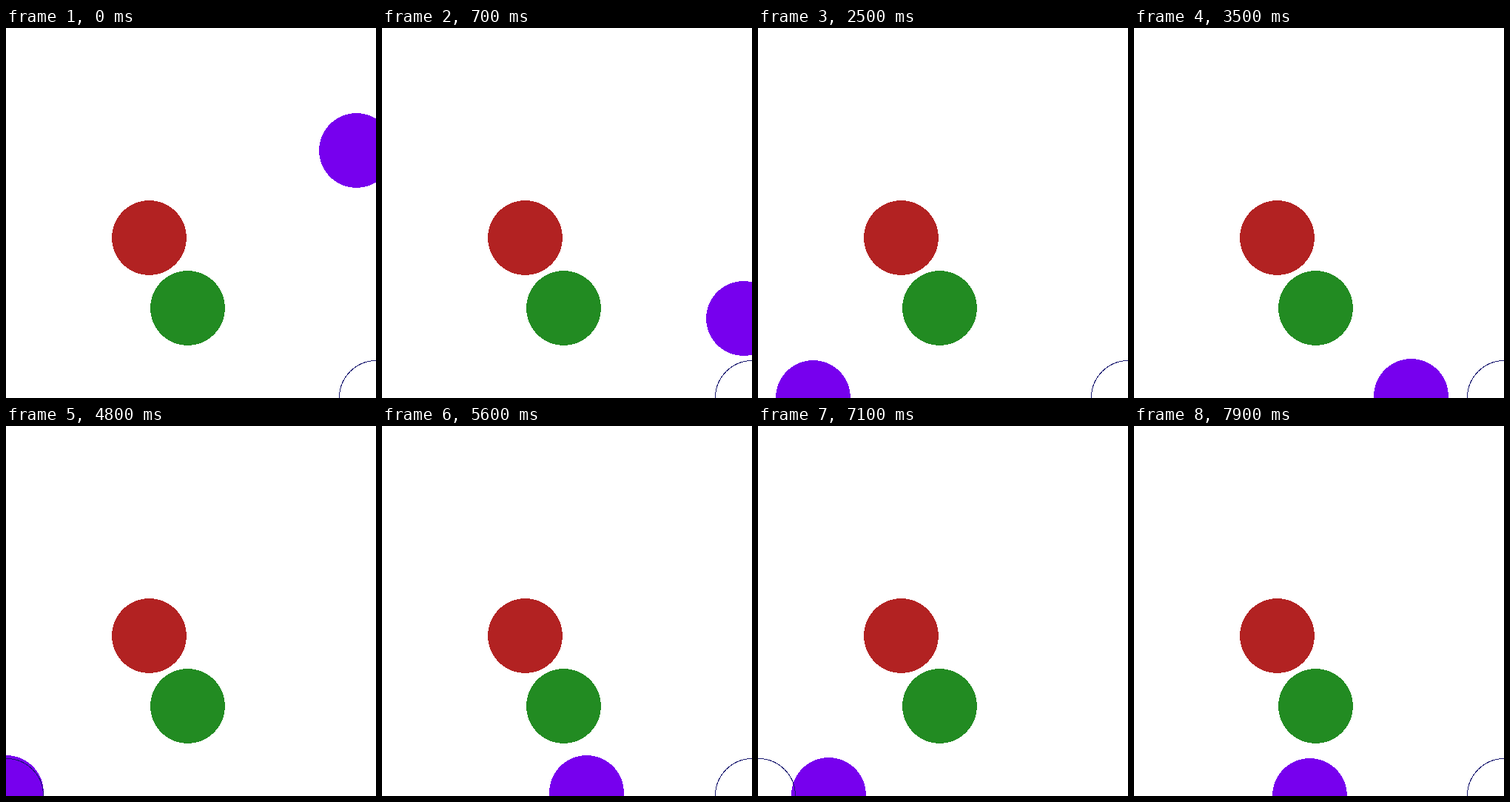
An HTML page that plays this animation: 500x500 px, repeating every 8 s.

```html
<!DOCTYPE html>
<html lang="en">
<head>
<meta charset="utf-8">
<title>Chasing circle</title>
<style>
  html, body { margin: 0; width: 100%; height: 100%; overflow: hidden; background: #fff; }
  svg { display: block; width: 100vw; height: 100vh; shape-rendering: crispEdges; }
</style>
</head>
<body>
<svg viewBox="0 0 500 500">
  <circle cx="193.5" cy="283.5" r="50.4" fill="#b22222"/>
  <circle cx="245.5" cy="378.5" r="50.4" fill="#228b22"/>
  <circle id="chaser" r="50.4" fill="#7700ee"/>
  <circle id="goal" cy="499.5" r="50" fill="none" stroke="#191970"/>
</svg>
<script>
  const LOOP = 8000, STEP = 100, SIZE = 500, FLOOR = 499;
  const FALL_SPEED = 0.3244, GOAL_DELAY = 100;
  const chaser = document.getElementById('chaser');
  const goal = document.getElementById('goal');

  // Where the chaser turns around; it runs at an even speed in between.
  const turns = [
    { t: 0, x: 473 }, { t: 1250, x: SIZE }, { t: 2253, x: 0 }, { t: 3700, x: 434 },
    { t: 4800, x: 0 }, { t: 6250, x: SIZE }, { t: 7300, x: 0 }, { t: LOOP, x: 276 }
  ];

  function legAt(t) {
    const end = turns.findIndex(turn => turn.t > t);
    return [turns[end - 1], turns[end]];
  }

  function chaserX(t) {
    const [from, to] = legAt(t);
    return from.x + (to.x - from.x) * (t - from.t) / (to.t - from.t);
  }

  // Falls to the floor, later rises a little and sinks back.
  function chaserY(t) {
    const phase = Math.min(1, Math.max(0, (t - 2500) / 5000));
    return Math.min(FLOOR, 165 + FALL_SPEED * t) - 4 * Math.sin(Math.PI * phase);
  }

  // The goal waits in the corner ahead and swaps shortly after each turn.
  function goalX(t) {
    const [from, to] = legAt(Math.max(0, t - GOAL_DELAY));
    return to.x > from.x ? SIZE : 0;
  }

  function draw(t) {
    chaser.setAttribute('cx', Math.round(chaserX(t)) + 0.5);
    chaser.setAttribute('cy', Math.round(chaserY(t)) + 0.5);
    goal.setAttribute('cx', goalX(t) + 0.5);
  }

  const start = performance.now();
  function tick() {
    const t = (performance.now() - start) % LOOP;
    draw(Math.floor(t / STEP) * STEP);
    requestAnimationFrame(tick);
  }
  draw(0);
  requestAnimationFrame(tick);
</script>
</body>
</html>
```
